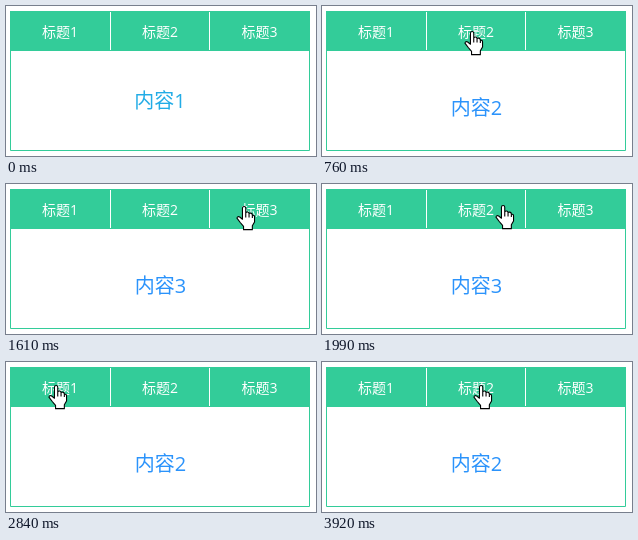
These frames come from a looping animation (310 px wide and 150 px high, 4.47 s). An HTML page:

```html
<!DOCTYPE html>
<html lang="zh">
<meta charset="utf-8">
<style>
  html, body { margin: 0; height: 100%; overflow: hidden; background: #fff; }
  svg { display: block; width: 310px; height: 150px; }
  text { font-family: "Open Sans", "Noto Sans CJK SC", sans-serif; text-anchor: middle; }
  .tabs { font-size: 14px; font-weight: 500; fill: #fff; }
  .pages { font-size: 20px; }
  .cursor path { fill: #fff; stroke: #000; stroke-linejoin: round; }
</style>
<svg viewBox="0 0 310 150">
  <clipPath id="panel"><path d="M5 45H303V144H5z"/></clipPath>
  <path d="M4.5 5.5H303.5V144.5H4.5z" fill="#fff" stroke="#3c9"/>
  <path d="M4 5H304V45H4z" fill="#3c9"/>
  <path d="M104.5 6V44M203.5 6V44" stroke="#fff"/>
  <g class="tabs">
    <text x="54" y="31">标题1</text>
    <text x="154" y="31">标题2</text>
    <text x="253.5" y="31">标题3</text>
  </g>
  <g clip-path="url(#panel)">
    <g id="pages" class="pages">
      <text x="154" y="101.5">内容1</text>
      <text x="154.5" y="208.5">内容2</text>
      <text x="154.5" y="308.5">内容3</text>
    </g>
  </g>
  <g id="cursor" class="cursor">
    <g id="ring" fill="none">
      <circle r="11" stroke="#000"/>
      <circle r="10" stroke="#fff"/>
    </g>
    <path id="hand" transform="scale(1.1)" d="M-.5 12V2Q-.5.5 1 .5T2.5 2V6.5Q2.5 5.500 4 5.500T5.500 7Q5.500 6.500 7 6.500T8.500 8.500Q10.500 8 10.500 10V14.500L8.500 18V21.500H.5V18.500L-2.500 15L-5.500 11Q-5 9-3 10ZM2.500 6.500V10.500M5.500 7V10.500M8.500 8.500V11"/>
    <path id="arrow" d="M.5.5V16.500L4.200 13L6.700 18.500L9 17.500L6.700 12H11.500z"/>
  </g>
</svg>
<script>
const LOOP = 4470, TICK = 76.6;
const MOVE = 380, HOLD = 100, SLIDE = 120, PAGE = 100;
const [pages, cursor, ring, hand, arrow] =
  ["pages", "cursor", "ring", "hand", "arrow"].map(id => document.getElementById(id));

// each visit: the cursor sets off, reaches a tab, presses it and a page slides in
const visits = [
  { go: 70, press: 525, x: 149, y: 25, page: 1 },
  { go: 765, press: 1290, x: 237, y: 22, page: 2 },
  { go: 1690, press: 2065, x: 174, y: 21, page: 1 },
  { go: 2460, press: 2835, x: 49, y: 23, page: 0 },
  { go: 3070, press: 3680, x: 158, y: 23, page: 1 }
];

const easeOut = (t, begin, length, power) =>
  1 - (1 - Math.min(1, Math.max(0, (t - begin) / length))) ** power;
const show = (el, on) => el.setAttribute("visibility", on ? "visible" : "hidden");

function draw(now) {
  const t = Math.floor((now % LOOP + 11) / TICK) * TICK;
  let x = 242, y = 136, page = 0, pressed = false;
  for (const v of visits) {
    const move = easeOut(t, v.go, MOVE, 1.5);
    x += (v.x - x) * move;
    y += (v.y - y) * move;
    page += (v.page - page) * easeOut(t, v.press + HOLD, SLIDE, 2);
    pressed ||= t >= v.press && t < v.press + HOLD;
  }
  const inside = t >= visits[0].go, onTabs = y < 45;
  const clicked = t > visits[0].press + HOLD;
  pages.setAttribute("transform", `translate(0 ${-PAGE * page})`);
  pages.setAttribute("fill", clicked ? "#2b93fb" : "#22ace6");
  cursor.setAttribute("transform", `translate(${Math.round(x)} ${Math.round(y)})`);
  show(ring, pressed);
  show(hand, inside && onTabs);
  show(arrow, inside && !onTabs);
}

const start = performance.now();
function loop() {
  draw(performance.now() - start);
  requestAnimationFrame(loop);
}
loop();
</script>
</html>
```
